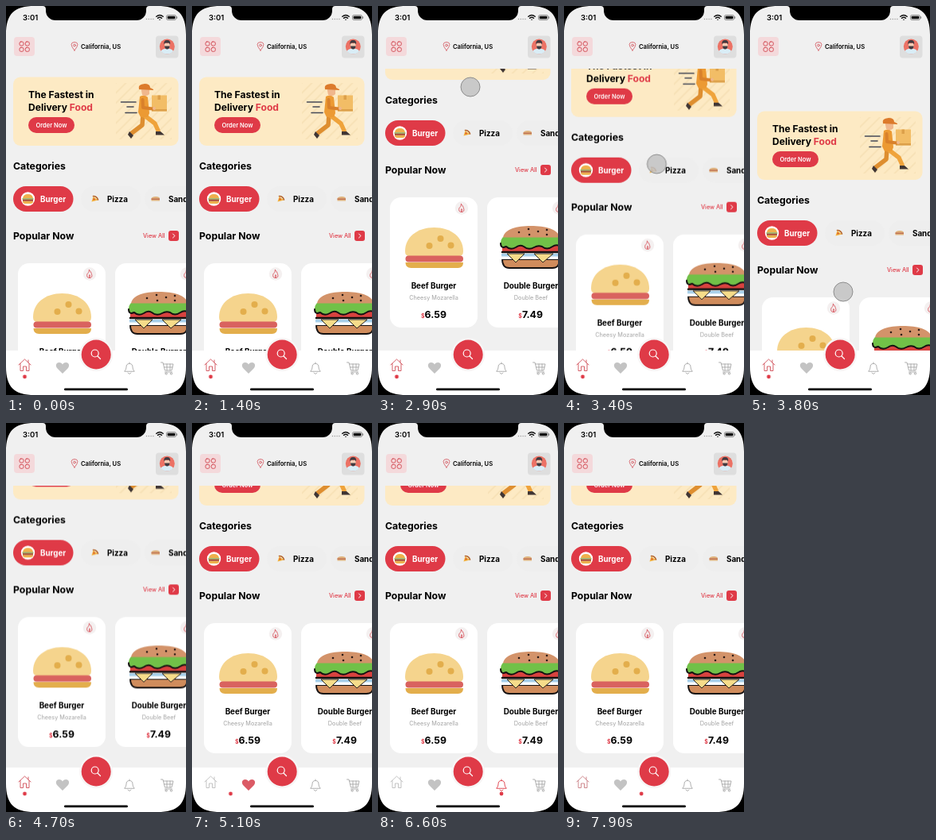
Animation, 226 px wide and 490 px high, one loop 8 s. Source, as an HTML page:

```html
<!DOCTYPE html>
<html lang="en">
<head>
<meta charset="utf-8">
<title>Food delivery app</title>
<style>
  html, body { margin: 0; width: 100%; height: 100%; overflow: hidden; background: #f0f0f0; }
  svg { display: block; width: 226px; height: 490px; font-family: Inter, "Open Sans", sans-serif; }
  .red { fill: #df3a47; }
  .h { font-size: 12.3px; font-weight: 700; }
  .b { font-size: 9.8px; font-weight: 700; }
  .s { font-size: 7.3px; fill: #a3a3a3; }
  .mid { text-anchor: middle; }
  .line { fill: none; stroke-linecap: round; stroke-linejoin: round; }

  #page, #touch, #dot, .tab { animation: 8s linear infinite; }
  #page { animation-name: scroll; }
  #touch { animation-name: drag; }
  #dot { animation-name: slide; }
  .tab { color: #bdbdbd; }
  #home { animation-name: home; }
  #heart { animation-name: heart; }
  #bell { animation-name: bell; }
  #cart { animation-name: cart; }

  @keyframes scroll {
    0%, 32.5% { transform: translateY(0); animation-timing-function: ease-in-out; }
    36.25% { transform: translateY(-83px); }
    38.75% { transform: translateY(-85px); animation-timing-function: ease-in-out; }
    47.5%, 48.5% { transform: translateY(43px); animation-timing-function: ease-in-out; }
    53.75% { transform: translateY(-168px); animation-timing-function: ease-in-out; }
    60%, 100% { transform: translateY(-72px); }
  }
  @keyframes drag {
    0%, 32.4% { opacity: 0; transform: translate(115px, 192px); }
    32.5% { opacity: 1; transform: translate(115px, 192px); animation-timing-function: ease-in-out; }
    36.25% { opacity: 1; transform: translate(116px, 102px); }
    38.75% { opacity: 1; transform: translate(116px, 100px); animation-timing-function: ease-in-out; }
    47.5%, 48.5% { opacity: 1; transform: translate(117px, 360px); animation-timing-function: ease-in-out; }
    52.8% { opacity: 1; transform: translate(117px, 150px); }
    53.2%, 100% { opacity: 0; transform: translate(117px, 140px); }
  }
  @keyframes slide {
    0%, 62.15% { transform: translateX(23.5px); }
    65.15%, 73.75% { transform: translateX(70px); }
    76.75%, 83.75% { transform: translateX(155px); }
    86.75%, 97% { transform: translateX(202px); }
    100% { transform: translateX(23.5px); }
  }
  @keyframes home {
    0%, 62.15% { color: #d14f58; }
    63.6%, 97% { color: #bdbdbd; }
    100% { color: #d14f58; }
  }
  @keyframes heart {
    0%, 62.15% { color: #c3c3c3; }
    64%, 73.75% { color: #df4a57; }
    75.5%, 100% { color: #c3c3c3; }
  }
  @keyframes bell {
    0%, 73.75% { color: #a8a8a8; }
    75.5%, 83.75% { color: #df3a47; }
    85.5%, 100% { color: #a8a8a8; }
  }
  @keyframes cart {
    0%, 83.75% { color: #a8a8a8; }
    85.5%, 97% { color: #df3a47; }
    98.5%, 100% { color: #a8a8a8; }
  }
</style>
</head>
<body>
<svg viewBox="0 0 226 490">
  <defs>
    <clipPath id="view"><rect y="79" width="226" height="411"/></clipPath>
    <pattern id="stripes" width="9" height="9" patternUnits="userSpaceOnUse" patternTransform="rotate(45)">
      <path d="M4 0V9" stroke="#efd6a4" stroke-width=".8"/>
    </pattern>
    <g id="burger">
      <path d="M-36.500 2C-36.500 -16 -21 -28 0 -28S36.500 -16 36.500 2Q36.500 8 31 8H-31Q-36.500 8 -36.500 2Z" fill="#f5d48d"/>
      <g fill="#e3ae4c">
        <circle cx="-6" cy="-5" r="4"/><circle cx="8" cy="-14" r="4"/><circle cx="21" cy="-5.500" r="4"/>
        <path d="M-36 16H36.500Q36.500 23 30 23H-29Q-36 23 -36 16Z"/>
      </g>
      <rect x="-36" y="7.500" width="72.500" height="8" rx="4" fill="#d9625f"/>
    </g>
    <g id="double">
      <path d="M-36 15H36Q36 26 27 26H-27Q-36 26 -36 15Z" fill="#d08c5c" stroke="#151111" stroke-width="1.800"/>
      <path d="M-37 7H37V15H-37Z" fill="#fff"/>
      <path d="M-37 8H37V11.500H-37Z" fill="#a6cfea"/>
      <path d="M-30 8H-8L-19 19ZM4 8H28L15 19Z" fill="#f6dc8a" stroke="#2a2320"/>
      <path d="M-36 -2H36V5H-36Z" fill="#d9423f"/>
      <path d="M-36 6H36" class="line" stroke="#151111" stroke-width="2.500"/>
      <path d="M-35 -13H36Q40 -6 36 -2Q31 -4 27 -1Q20 4 14 -1Q9 -3 4 0Q-3 4 -9 -1Q-14 -4 -19 0Q-26 4 -31 -1Q-38 2 -38 -5Q-38 -10 -35 -13Z" fill="#71c148"/>
      <path d="M-38 -5Q-38 2 -31 -1Q-26 4 -19 0Q-14 -4 -9 -1Q-3 4 4 0Q9 -3 14 -1Q20 4 27 -1Q31 -4 36 -2" class="line" stroke="#151111" stroke-width="2"/>
      <path d="M-35 -12.500C-33 -23 -18 -27 0 -27S34 -23 36 -12.500Z" fill="#d3936a"/>
      <g fill="#2c1c18">
        <circle cx="-15" cy="-19" r="1.300"/><circle cx="-3" cy="-23" r="1.300"/><circle cx="9" cy="-20" r="1.300"/>
        <circle cx="20" cy="-22" r="1.300"/><circle cx="-2" cy="-16" r="1.300"/><circle cx="20" cy="-16" r="1.300"/>
      </g>
    </g>
    <g id="card">
      <rect x="15" y="324" width="110" height="164" rx="14" fill="#fff"/>
      <circle cx="105" cy="337.500" r="8.200" fill="#f4f0f0"/>
      <path class="line" d="M104.500 332.500Q107 335 107.500 337.500Q109 342.500 105 342.500Q100.500 342.500 102 337.500Q104.500 336 104.500 332.500ZM105 342Q103.500 340.500 105 338.500Q106.500 340.500 105 342Z" stroke="#d8565f" stroke-width=".9"/>
    </g>
  </defs>

  <rect width="226" height="490" fill="#f0f0f0"/>

  <g clip-path="url(#view)">
    <g id="page">
      <rect x="9" y="89.500" width="207.500" height="86.500" rx="9" fill="#fdeac4"/>
      <rect x="138" y="97" width="70" height="71" fill="url(#stripes)"/>
      <g font-size="12.050" font-weight="700">
        <text x="28" y="116">The Fastest in</text>
        <text x="28" y="132.300">Delivery <tspan class="red">Food</tspan></text>
      </g>
      <rect class="red" x="28" y="140" width="58" height="20" rx="10"/>
      <text x="57" y="152.700" class="mid" font-size="7.500" font-weight="600" fill="#fff">Order Now</text>

      <g id="courier">
        <path class="line" d="M144.500 121H163M152 127H160M150 134.500H164" stroke="#454a57" stroke-width="1.600"/>
        <path class="line" d="M172 138L171 150 158 160" stroke="#de8e30" stroke-width="5.500"/>
        <path class="line" d="M174 138L187 148 191 157" stroke="#efa33b" stroke-width="5.500"/>
        <path d="M155 158L160 163 157 167 153 162ZM188 158H194L199 162.500H188Z" fill="#403634"/>
        <path d="M168 114Q174 111 178 115L180 135 178 140H169L166 134Z" fill="#ec9a33"/>
        <path d="M169.500 104H180V111Q176 115 171 112Z" fill="#f0b78c"/>
        <path d="M167 105Q165 98.500 174 98Q181 98 181 103L185 105V106Z" fill="#dc7a2b"/>
        <rect x="183" y="112.500" width="19" height="20" fill="#f2bd66"/>
        <path d="M190.500 112.500H194V118H190.500ZM183 130H202V132.500H183Z" fill="#dca04a"/>
        <path class="line" d="M171.500 118L172 128 184 129.500" stroke="#d9812b" stroke-width="4"/>
        <circle cx="186" cy="129" r="2" fill="#f0b78c"/>
      </g>

      <text class="h" x="9" y="205.800">Categories</text>
      <g fill="#eee"><rect x="94" y="227" width="75" height="32" rx="16"/><rect x="174" y="227" width="90" height="32" rx="16"/></g>
      <rect class="red" x="9" y="227" width="75.500" height="32" rx="16"/>
      <circle cx="27.500" cy="243" r="8.700" fill="#fff"/>
      <g id="burgerIcon">
        <path d="M21 242Q22 237 27.500 237T34 242Z" fill="#eeb04c"/>
        <path d="M20.500 243H34.500" stroke="#7d9a3c" stroke-width="1.400"/>
        <path d="M21 244.800H34" stroke="#a8492f" stroke-width="2"/>
        <path d="M21 246H34Q34 249 31 249H24Q21 249 21 246Z" fill="#eeb04c"/>
      </g>
      <text class="b" x="43" y="246.500" fill="#fff">Burger</text>
      <path d="M107.500 246.500L109.500 240 115.500 244.500Z" fill="#f2b23e"/>
      <path d="M109.500 239.500Q114 239.500 115.500 244" class="line" stroke="#b4652c" stroke-width="1.600"/>
      <circle cx="110.500" cy="243.500" r="1" fill="#d34036"/>
      <text class="b" x="127" y="246.500">Pizza</text>
      <path d="M182.500 242.500Q183 240 188 240T193 242.500V245.500H182.500Z" fill="#dfb27c"/>
      <path d="M182.500 243.200H193" stroke="#b9644c" stroke-width="1.200"/>
      <text class="b" x="204" y="246.500">Sandwich</text>

      <text class="h" x="9" y="294.300">Popular Now</text>
      <text class="red" x="172" y="292.300" font-size="7.200" font-weight="500">View All</text>
      <rect class="red" x="204" y="283" width="13" height="13" rx="3"/>
      <path class="line" d="M209.500 287L212 289.500 209.500 292" stroke="#fff"/>

      <use href="#card"/>
      <use href="#burger" x="70.500" y="390"/>
      <text class="b mid" x="70" y="439">Beef Burger</text>
      <text class="s mid" x="70" y="452.700">Cheesy Mozarella</text>
      <text class="h" x="54" y="476"><tspan class="red" font-size="7">$</tspan>6.59</text>

      <use href="#card" x="122"/>
      <use href="#double" x="192" y="387"/>
      <text class="b mid" x="192" y="439">Double Burger</text>
      <text class="s mid" x="192" y="452.700">Double Beef</text>
      <text class="h" x="176.300" y="476"><tspan class="red" font-size="7">$</tspan>7.49</text>
    </g>
  </g>

  <g id="header">
    <rect x="10" y="39" width="26" height="24" rx="4" fill="#f4d9db"/>
    <g class="line" stroke="#d4525b">
      <rect x="17" y="45" width="5" height="5" rx="1.800"/><rect x="24.300" y="45" width="5" height="5" rx="1.800"/>
      <rect x="17" y="52.300" width="5" height="5" rx="1.800"/><rect x="24.300" y="52.300" width="5" height="5" rx="1.800"/>
      <path d="M86 56Q78 46 86 45.500Q94 46 86 56Z" stroke-width=".8"/><circle cx="86" cy="49.500" r="1.400" stroke-width=".8"/>
    </g>
    <text x="94" y="53.600" font-size="7.600" font-weight="600">California, US</text>
    <rect x="188" y="37.500" width="28.500" height="28" rx="4" fill="#dedede"/>
    <circle cx="202.300" cy="51" r="9.500" fill="#ec7265"/>
    <path d="M194.500 57Q196 53.500 202.300 53.500T210 57Q207 60.500 202.300 60.500T194.500 57Z" fill="#d9edf6"/>
    <path d="M199 47H205.600V51Q202.300 56 199 51Z" fill="#f2cdb6"/>
    <path d="M198.500 48.500Q197.500 43 202.300 43T206 48.500L204.500 46.500H200ZM199 50.500H205.600Q205 54.500 202.300 54.500T199 50.500Z" fill="#403a40"/>
  </g>

  <g id="bar">
    <rect y="434" width="226" height="56" fill="#fff"/>
    <circle cx="113.200" cy="439" r="21" fill="#f7f5f5"/>
    <circle class="red" cx="113.200" cy="439" r="18.500"/>
    <g class="line" stroke="#fff" stroke-width="1.200"><circle cx="111.700" cy="437.500" r="4.500"/><path d="M115 441L118.500 444.500"/></g>
    <g class="line" stroke-width=".9">
      <path id="home" class="tab" stroke="currentColor" d="M16 452L23.500 445 31 452M18 450.500V459.500H21.500V454H25.500V459.500H29V450.500M28 446V449"/>
      <path id="bell" class="tab" stroke="currentColor" d="M149 460Q151 458 151 455Q151 450.500 155 450.500T159 455Q159 458 161 460ZM153 462Q155 465 157 462M155 449V450.500"/>
      <path id="cart" class="tab" stroke="currentColor" d="M194.500 449H197L199.500 459H208L210 451H197.500M198.500 455H209M202 451V459M206 451V459M199.500 461H208.500M200 463A1.200 1.200 0 1 0 202.400 463A1.200 1.200 0 1 0 200 463M206.300 463A1.200 1.200 0 1 0 208.700 463A1.200 1.200 0 1 0 206.300 463"/>
    </g>
    <path id="heart" class="tab" fill="currentColor" d="M71 463L64 456C60 450 67.500 446.500 71 451.500C74.500 446.500 82 450 78 456Z"/>
    <circle id="dot" class="red" cy="467" r="2.400"/>
    <rect x="73" y="481.500" width="80" height="2.800" rx="1.400"/>
  </g>

  <circle id="touch" r="12" fill="#c2c2c2" fill-opacity=".85" stroke="#8c8c8c"/>

  <g id="frame">
    <path fill-rule="evenodd" d="M0 0H226V490H0ZM36 0C10 0 0 10 0 36V454C0 480 10 490 36 490H190C216 490 226 480 226 454V36C226 10 216 0 190 0Z"/>
    <path d="M46 0Q50 0 50 4V6A12 12 0 0 0 62 18H164A12 12 0 0 0 176 6V4Q176 0 180 0Z"/>
    <text x="21" y="18.300" font-size="9.500" font-weight="600">3:01</text>
    <path class="line" d="M176.500 16.500H185" stroke="#999" stroke-width="1.400" stroke-dasharray="0 2.800"/>
    <g class="line" stroke="#111" stroke-width="1.500"><path d="M188.800 13.300Q193 9.700 197.200 13.300M190.500 15.300Q193 13.300 195.500 15.300M193 17.200V17.300"/></g>
    <rect x="201.500" y="11.500" width="12" height="6" rx="1.700" fill="none" stroke="#777" stroke-width=".8"/>
    <rect x="202.700" y="12.700" width="9.600" height="3.600" rx=".8"/>
    <path d="M214.700 13.300V15.700" stroke="#777"/>
  </g>
</svg>
</body>
</html>
```
